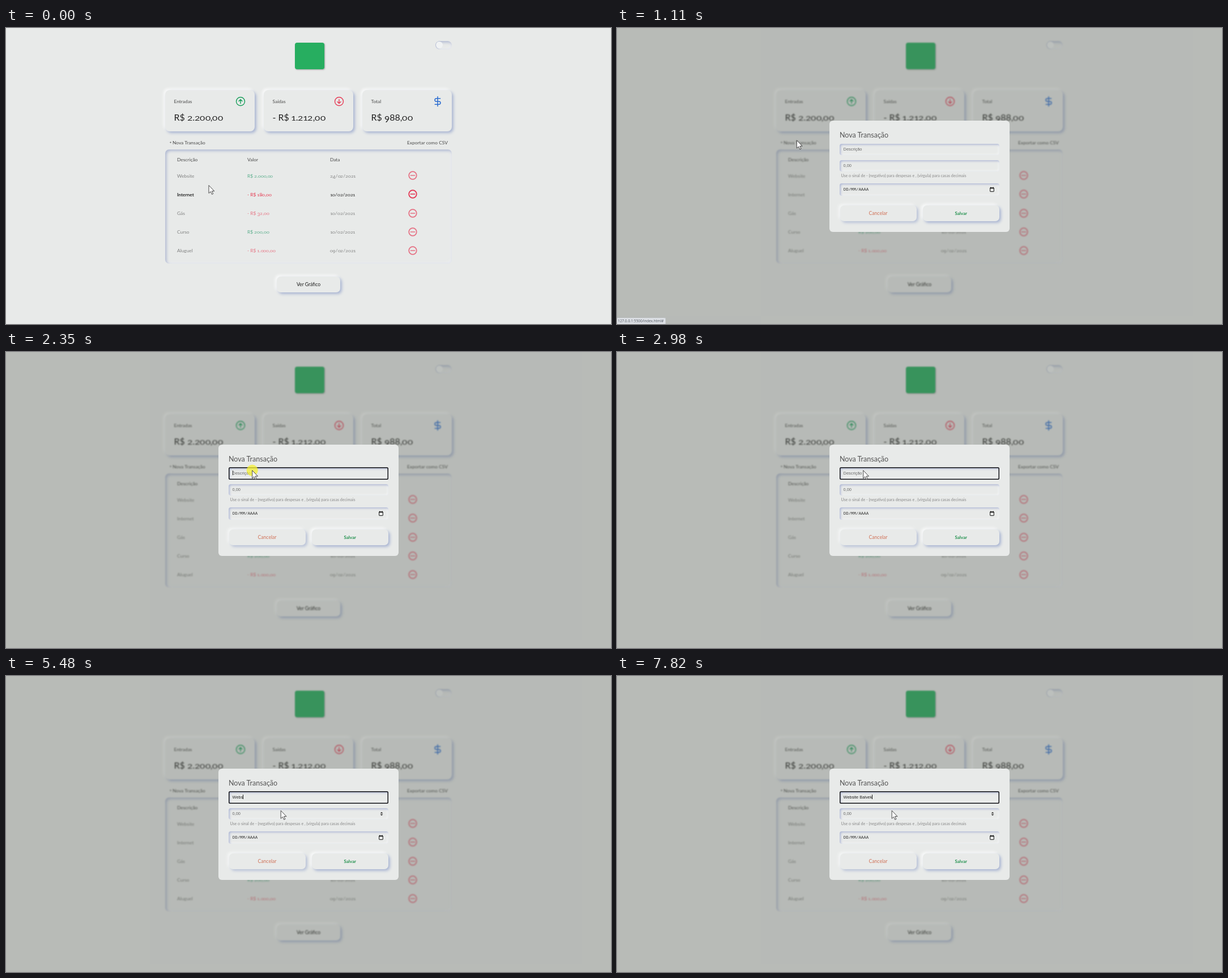
These frames come from a looping animation (1068x524 px, 8 s). An HTML page:

```html
<!DOCTYPE html>
<html lang="pt-BR">
<head>
<meta charset="utf-8">
<title>Finanças</title>
<style>
  html, body { margin: 0; width: 1068px; height: 524px; overflow: hidden; background: #e8eae9; }
  #stage { position: relative; width: 1068px; height: 524px; overflow: hidden;
    font: 8.4px/20px Lato, sans-serif; color: #4a4a4a; }
  #stage div, #stage svg, .txt { position: absolute; box-sizing: border-box; }
  svg { fill: none; overflow: visible; }
  .layer { left: 0; top: 0; width: 1068px; height: 524px; }
  .txt { white-space: nowrap; }
  .up { border-radius: 8px; background: #e8eae9;
    box-shadow: 2.8px 2.8px 5.5px #a8b4d2, -2.8px -2.8px 5.5px rgba(255,255,255,.75); }
  .in { border-radius: 7px;
    box-shadow: inset 2.4px 2.4px 5px #b0b9d2, inset -1.6px -1.6px 4px rgba(236,238,246,.7); }
  .field { border-radius: 4px;
    box-shadow: inset 1.8px 1.8px 3.8px #b0b9d6, inset -1.8px -1.8px 3.8px rgba(255,255,255,.5); }
  .big { font-size: 16px; color: #222; }
  .mid { text-align: center; }
  .arial { font-family: "Liberation Sans", Arial, sans-serif; font-size: 7.4px; color: #686868; }
  .mono { font-family: "Liberation Mono", monospace; font-size: 7.4px; color: #333; }
  .row { opacity: .65; }
  .row.on { opacity: 1; color: #222; }
  .row.on .name { font-weight: 600; color: #111; }
  .gain { color: #0c8d58; }
  .loss { color: #e5344c; }
  #link.on { font-weight: 600; color: #222; }
  /* old-style figures */
  i { display: inline-block; font-style: normal; line-height: 1.2; transform-origin: 0 82.25%; }
  i.small { transform: scaleY(.73); }
  i.one { margin: 0 -.05em; }
  i.low { transform: translateY(.18em); }
  #shade { background: rgba(90,95,85,.34); }
  #modal { left: 374.5px; top: 163.5px; width: 318.5px; height: 197px; border-radius: 6px; background: #e8eae9; }
  #ring { left: 393px; top: 204.2px; width: 282px; height: 21.6px; border-radius: 2.5px;
    box-shadow: inset 0 0 0 1.5px #101014; }
  #caret { display: inline-block; width: 1px; height: 8.5px; vertical-align: -1.8px; background: #222; margin-right: -1px; }
  #status { left: 0; top: 513px; width: 86px; height: 11px; padding-left: 1.5px; white-space: nowrap;
    font: 6.35px/11px "Open Sans", sans-serif; color: #4c535c; background: #dee1e6;
    box-shadow: inset -.6px .6px #c3c7cd; border-radius: 0 2px 0 0; }
  #glow { left: -10px; top: -10px; width: 20px; height: 20px; border-radius: 50%; background: rgba(246,240,50,.75); }
</style>
</head>
<body>
<div id="stage">
  <div id="page" class="layer"></div>
  <div id="dialog" class="layer"></div>
  <div id="status">127.0.0.1:5500/index.html#</div>
  <div id="cursor" style="left:0;top:0">
    <div id="glow"></div>
    <svg width="11" height="17" style="left:0;top:0">
      <path d="M0 0V14L3.2 11.1 5.5 16 7.7 15 5.4 10.3H9.8Z" fill="#fff" stroke="#333" stroke-width=".9" stroke-linejoin="round"/>
    </svg>
  </div>
</div>
<script>
const $ = id => document.getElementById(id);
const LOOP = 8000;

const figure = d => {
  const kind = d === '1' ? 'small one' : '02'.includes(d) ? 'small' : '34579'.includes(d) ? 'low' : '';
  return `<i class="${kind}">${d}</i>`;
};
const num = s => s.replace(/\d/g, figure);
const txt = (x, y, s, cls = '', style = '') =>
  `<span class="txt ${cls}" style="left:${x}px;top:${y - 10}px;${style}">${s}</span>`;
const box = (x, y, w, h, cls, style = '') =>
  `<div class="${cls}" style="left:${x}px;top:${y}px;width:${w}px;height:${h}px;${style}"></div>`;
const icon = (x, y, color, width, body) =>
  `<svg width="1" height="1" style="left:${x}px;top:${y}px" stroke="${color}" stroke-width="${width}" stroke-linecap="round" stroke-linejoin="round">${body}</svg>`;
const button = (x, y, w, h, label, style) =>
  box(x, y, w, h, 'up', style) + txt(x, y + h / 2, label, 'mid', `width:${w}px;${style}`);

const arrow = dir => `<circle r="7.5"/><path d="M0 ${3.5 * dir}V${-3.5 * dir}M-3 ${-.5 * dir}L0 ${-3.5 * dir} 3 ${-.5 * dir}"/>`;
const dollar = '<path d="M0-8.6V8.6M4.6-5.2H-2A3 2.6 0 0 0-2 0H2A3 2.6 0 0 1 2 5.2H-4.8"/>';

const cards = [
  [281, 'Entradas', 'R$ 2.200,00', icon(414.2, 130.2, '#1a9f5c', 1.4, arrow(1))],
  [455, 'Saídas', '- R$ 1.212,00', icon(588, 130.2, '#e63c56', 1.4, arrow(-1))],
  [629, 'Total', 'R$ 988,00', icon(761.5, 130.2, '#2b6cd0', 1.5, dollar)],
];
const entries = [
  ['Website', 'R$ 2.000,00', '24/02/2021'],
  ['Internet', '- R$ 180,00', '10/02/2021'],
  ['Gás', '- R$ 32,00', '10/02/2021'],
  ['Curso', 'R$ 200,00', '10/02/2021'],
  ['Aluguel', '- R$ 1.000,00', '09/02/2021'],
];
const ROW_TOP = 244.8, ROW_H = 33.15;

$('page').innerHTML =
  box(510, 26, 51.5, 47, '', 'background:#27ae60;border-radius:4px;box-shadow:1px 1px 2.5px rgba(0,0,0,.3)') +
  box(757.5, 22.5, 29.5, 15.5, 'in', 'border-radius:8px') +
  box(759, 24, 12, 12, '', 'border-radius:50%;background:#f0f2f3') +
  cards.map(([x, label, value, mark]) =>
    box(x, 109.5, 158, 73, 'up') + txt(x + 15.5, 130, label) +
    txt(x + 15.5, 158, num(value), 'big') + mark).join('') +
  txt(288.5, 202.5, '+', '', 'font-size:6.5px;font-weight:600') +
  `<span id="link">${txt(294, 202.5, 'Nova Transação')}</span>` +
  txt(708, 202.5, 'Exportar como CSV') +
  box(281, 215, 506, 201.5, 'in') +
  txt(302, 233, 'Descrição') + txt(426, 233, 'Valor') + txt(572, 233, 'Data') +
  entries.map(([name, value, date], k) => {
    const y = 261.8 + k * ROW_H;
    return '<div class="row layer">' + txt(302, y, name, 'name') +
      txt(426, y, num(value), value[0] === '-' ? 'loss' : 'gain') + txt(572, y, num(date)) +
      icon(717.7, y - .6, '#e4304e', 1.7, '<circle r="6.8"/><path d="M-3.6 0H3.6"/>') + '</div>';
  }).join('') +
  button(478, 440, 112, 28, 'Ver Gráfico', 'font-size:8.6px;color:#1c1c1c;border-radius:7px');

$('dialog').innerHTML =
  '<div id="shade" class="layer"></div><div id="modal"></div>' +
  txt(393, 189.7, 'Nova Transação', '', 'font-size:12.5px;color:#555') +
  [[205, 20], [233.5, 20.5], [274.5, 22.5]].map(([y, h]) => box(393.3, y, 281.4, h, 'field')).join('') +
  '<div id="ring"></div>' +
  txt(399.6, 214.7, 'Descrição', 'arial hint') +
  txt(399.6, 214.7, '<span id="typed"></span><span id="caret"></span>', 'arial', 'color:#222;white-space:pre') +
  txt(399.6, 243.9, '0,00', 'arial') +
  txt(395.5, 262, 'Use o sinal de - (negativo) para despesas e , (vírgula) para casas decimais', '', 'font-size:7.05px;color:#888') +
  txt(399.8, 286, 'DD/MM/AAAA', 'mono') +
  icon(661.5, 286, '#111', 1, '<rect x="-3.3" y="-3" width="6.6" height="6.6" rx=".5"/><path d="M-3-2.4H3M-2-3.9V-3M2-3.9V-3" stroke-width="1.4"/>') +
  `<span id="spin">${icon(663.2, 243.8, 'none', 0, '<path d="M-2.4-.8L0-3.2 2.4-.8ZM-2.4.8L0 3.2 2.4.8Z" fill="#333"/>')}</span>` +
  button(393.5, 313.5, 135, 28, 'Cancelar', 'font-size:8.6px;font-weight:500;color:#cb5636;opacity:.75;border-radius:7px') +
  button(540, 313.5, 134.5, 28, 'Salvar', 'font-size:8px;font-weight:700;color:#23914f;border-radius:7px');

// Step tables: [start in ms, value...]
const path = [
  [0, 358, 278.5], [160, 357, 275], [310, 352, 262], [470, 342, 238], [630, 331, 214],
  [780, 325, 203], [940, 324.3, 201.5], [1110, 317.3, 198.8], [1260, 322, 201],
  [1420, 346, 206], [1570, 382, 210], [1730, 412, 212], [1890, 430, 211],
  [2050, 434.7, 209.6], [3290, 464, 226], [3440, 485.2, 238.3],
];
const carets = [[0, 0], [2350, 1], [2980, 0], [3440, 1], [3910, 0], [4070, 1], [5000, 0], [5480, 1], [6550, 0], [6870, 1]];
const phrase = 'Website Balvek';
const typing = [[0, 0], [4070, 1], [4230, 2], [4540, 3], [5480, 4], [5630, 5], [5940, 7],
  [6870, 8], [7030, 9], [7180, 10], [7340, 11], [7500, 12], [7660, 13], [7820, 14]];

const at = (steps, t) => steps.filter(s => s[0] <= t).pop().slice(1);
const between = (t, a, b) => t >= a && t < b;
const show = (el, on) => { el.style.visibility = on ? 'visible' : 'hidden'; };
const rows = [...document.querySelectorAll('.row')];
const hint = document.querySelector('.hint');

function render(t) {
  const [x, y] = at(path, t);
  const [count] = at(typing, t);
  const open = t >= 1110;
  const hovered = open ? -1 : Math.floor((y - ROW_TOP) / ROW_H);

  $('cursor').style.transform = `translate(${x}px,${y}px)`;
  rows.forEach((row, k) => row.classList.toggle('on', k === hovered));
  $('link').className = !open && y < 209 ? 'on' : '';
  $('page').style.filter = open ? 'blur(1.1px)' : 'none';
  $('dialog').style.display = open ? '' : 'none';
  $('typed').textContent = phrase.slice(0, count);

  show($('status'), between(t, 780, 1420));
  show($('glow'), between(t, 940, 1110) || between(t, 2350, 2520));
  show($('ring'), t >= 2350);
  show($('spin'), t >= 3440);
  show($('caret'), at(carets, t)[0]);
  show(hint, !count);
}

const start = performance.now();
function tick() {
  render((performance.now() - start) % LOOP);
  requestAnimationFrame(tick);
}
tick();
</script>
</body>
</html>
```
